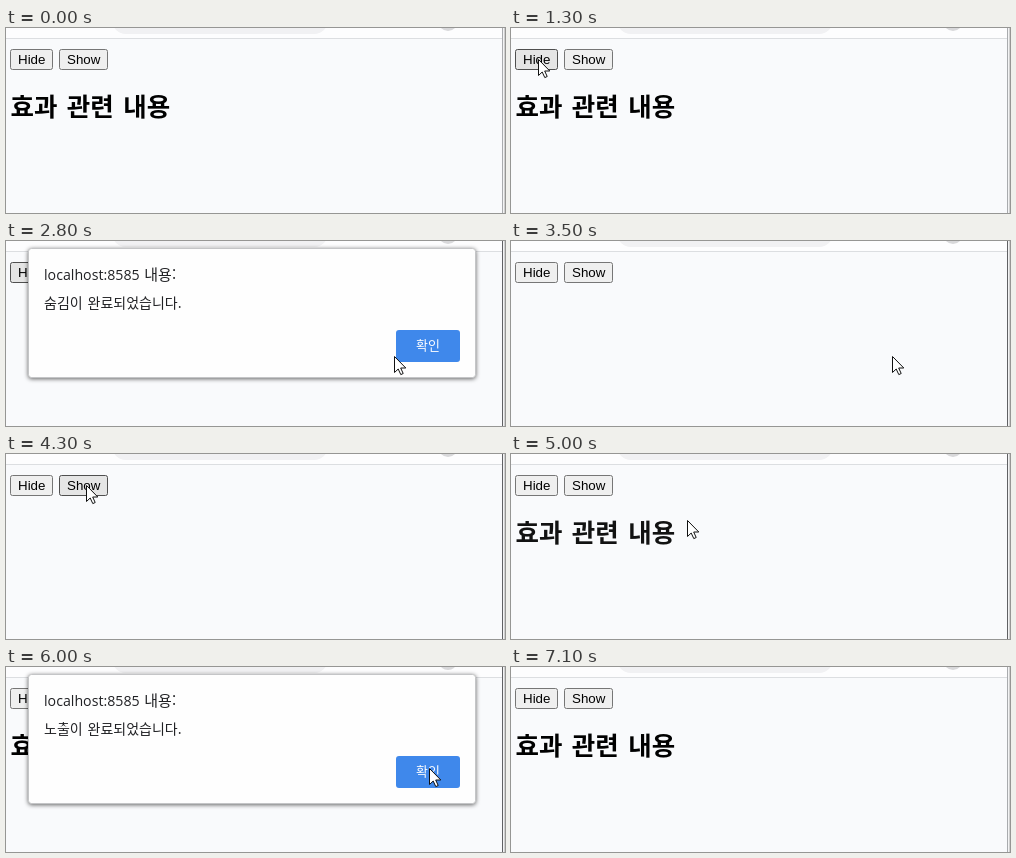
Animation, 499 px wide and 185 px high, one loop 7200 ms. Source, as an HTML page:

```html
<!DOCTYPE html>
<html lang="ko">
<head>
<meta charset="utf-8">
<title>Hide / Show</title>
<style>
  html, body { margin: 0; width: 100%; height: 100%; overflow: hidden; background: #f9fafc; }
  svg { display: block; }
  text { font-family: "Noto Sans CJK KR", "Noto Sans CJK", sans-serif; }
  .button text { font: 13.333px "Liberation Sans", Arial, sans-serif; }
  .button rect { fill: #efefef; stroke: #767676; }
  .button.hover rect { fill: #e5e5e5; stroke: #4f4f4f; }
  #heading { font-size: 25.5px; font-weight: 700; word-spacing: 2.3px; }
  #panel { fill: #fefefe; stroke: #c4c5c7; filter: drop-shadow(0 1px 2px #0009); }
  #dialog text { fill: #202124; }
  #origin { font-size: 15px; }
  #origin tspan { font: 14.2px "Open Sans", sans-serif; }
  #message { font-size: 14px; word-spacing: 1px; }
  #dialog #ok { font-size: 13px; fill: #fff; }
</style>
</head>
<body>
<svg width="499" height="185" viewBox="0 0 499 185">
  <rect width="499" height="185" fill="#f9fafc"/>
  <rect width="496" height="10" fill="#fdfdfe"/>
  <rect x="106" y="-22" width="216" height="28" rx="14" fill="#f1f1f3"/>
  <circle cx="442" cy="-7" r="10" fill="#d8d8da"/>
  <rect y="10" width="496" height="1" fill="#dcdee1"/>
  <rect x="497" width="1" height="185" fill="#f3f3f4"/>
  <rect x="498" width="1" height="185" fill="#cfcfcf"/>
  <rect id="edge" x="496" width="1" height="185"/>

  <g id="hide" class="button">
    <rect x="4.5" y="21.5" width="42" height="20" rx="2"/>
    <text x="12" y="36">Hide</text>
  </g>
  <g id="show" class="button">
    <rect x="53.5" y="21.5" width="48" height="20" rx="2"/>
    <text x="61" y="36">Show</text>
  </g>
  <text id="heading" x="4.5" y="87.5">효과 관련 내용</text>

  <g id="dialog">
    <rect id="panel" x="22.5" y="7.5" width="447" height="129" rx="3"/>
    <text id="origin" x="38" y="39"><tspan>localhost:8585 </tspan>&#8202;내용:</text>
    <text id="message" x="38" y="67"></text>
    <rect x="390" y="89" width="64" height="32" rx="3" fill="#3f88eb"/>
    <text id="ok" x="422" y="109" text-anchor="middle">확인</text>
  </g>

  <path id="cursor" d="M.5 .5V16.5L4.2 13L6.8 18.6L9.2 17.5L6.7 12H11.8Z" fill="#fff" stroke="#111"/>
</svg>
<script>
const LOOP = 7200, STEP = 100, FADE = 400;
const $ = id => document.getElementById(id);
const within = (t, from, to) => t >= from && t < to;

// Pointer path: time, x, y
const path = [
  [1000, 33, 0], [1300, 27, 31], [2400, 27, 31], [2800, 388, 115],
  [3000, 402, 106], [3300, 402, 106], [3500, 381, 115], [3900, 97, 53],
  [4000, 94, 48], [4300, 80, 31], [4700, 80, 31], [5000, 176, 66],
  [5100, 231, 72], [5300, 289, 80], [5400, 289, 80], [5700, 423, 101],
  [6200, 423, 101], [6600, 512, -10]
];

function pointerAt(t) {
  const i = path.findIndex(p => p[0] > t);
  const [t0, x0, y0] = path[i - 1], [t1, x1, y1] = path[i];
  const k = (t - t0) / (t1 - t0);
  return [x0 + (x1 - x0) * k, y0 + (y1 - y0) * k].map(Math.round);
}

function swing(t, start) {
  const k = Math.min(1, Math.max(0, (t - start) / FADE));
  return 0.5 - Math.cos(Math.PI * k) / 2;
}

function toggle(id, on) {
  $(id).style.display = on ? "" : "none";
}

function draw(now) {
  const t = Math.floor(now % LOOP / STEP) * STEP;

  $("edge").setAttribute("fill", within(t, 1600, 7100) ? "#606164" : "#a9abae");
  $("hide").classList.toggle("hover", within(t, 1200, 3200));
  $("show").classList.toggle("hover", within(t, 4200, 4800));
  $("heading").style.opacity = 1 - swing(t, 1690) + swing(t, 4670);

  toggle("dialog", within(t, 2400, 3200) || within(t, 5400, 6100));
  $("message").textContent = (t < 4000 ? "숨김이" : "노출이") + " 완료되었습니다.";

  const visible = within(t, 1000, 6600);
  toggle("cursor", visible);
  if (visible) $("cursor").setAttribute("transform", `translate(${pointerAt(t)})`);
}

const start = performance.now();
function frame() {
  draw(performance.now() - start);
  requestAnimationFrame(frame);
}
frame();
</script>
</body>
</html>
```
